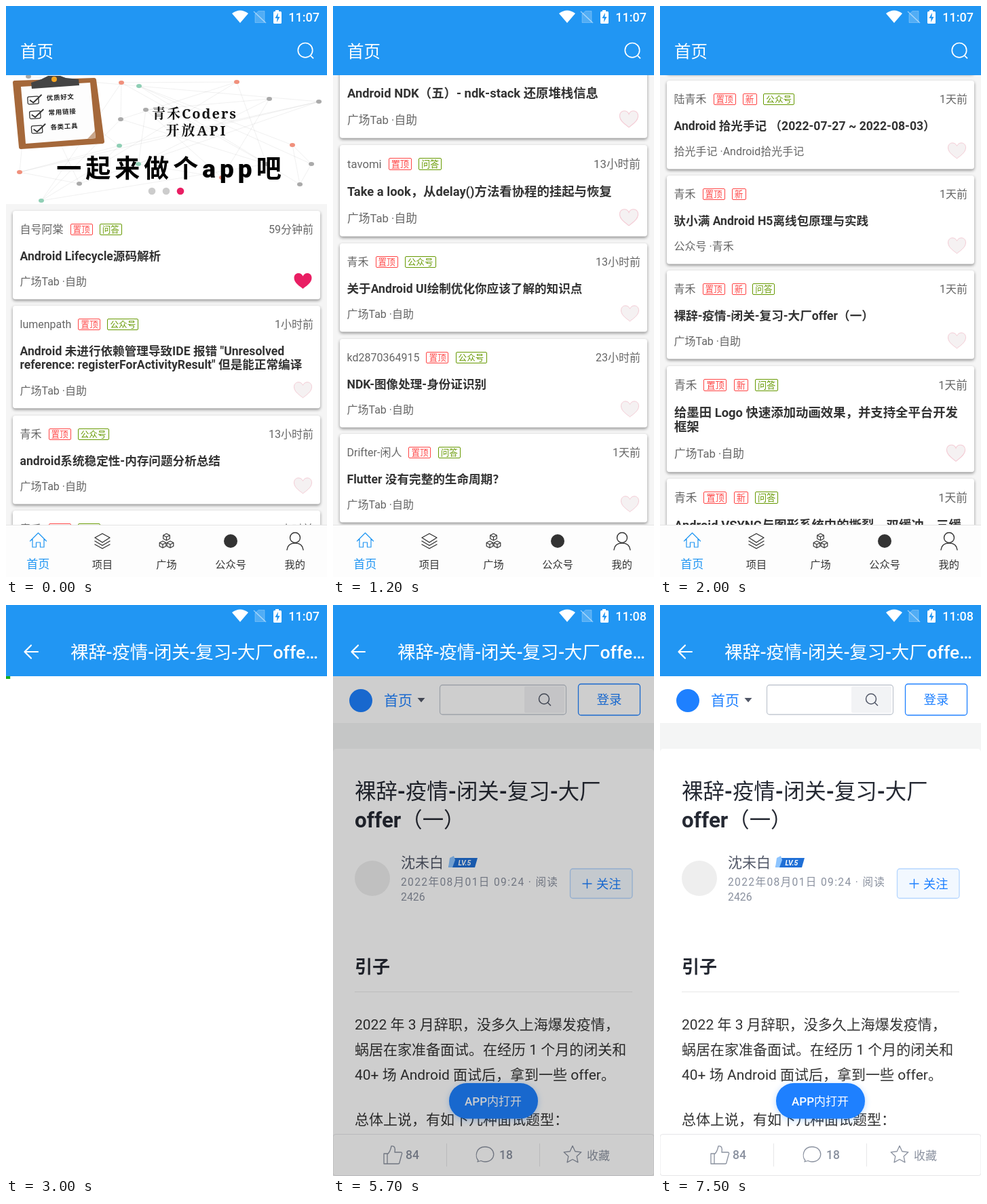
These frames come from a looping animation (473 by 842 pixels, 8000 ms). An HTML page with a canvas:

```html
<!DOCTYPE html>
<html lang="zh-CN">
<head>
<meta charset="utf-8">
<title>文章阅读</title>
<style>
html, body { margin: 0; width: 100%; height: 100%; overflow: hidden; background: #fff; }
canvas { display: block; width: 473px; height: 842px; }
</style>
</head>
<body>
<canvas id="stage"></canvas>
<script>
const W = 473, H = 842, LOOP = 8000;
const BLUE = '#2196f3', LINK = '#1e80ff', PINK = '#e91e63', RED = '#ff4444', GREEN = '#669900';
const FONT = 'Roboto, "Noto Sans CJK SC", "Noto Sans CJK", sans-serif';
const SERIF = '"Noto Serif", "Noto Serif CJK SC", "Noto Sans CJK SC", serif';
const HEART = new Path2D('M0 11.5C-4 8-13 3-13-4.5C-13-9-10-11.5-6.5-11.5C-3.5-11.5-1-9.5 0-7C1-9.5 3.5-11.5 6.5-11.5C10-11.5 13-9 13-4.5C13 3 4 8 0 11.5Z');

const canvas = document.getElementById('stage');
const ctx = canvas.getContext('2d');
const dpr = window.devicePixelRatio || 1;
canvas.width = W * dpr;
canvas.height = H * dpr;

// name, tags, time, title, category, large layout
const posts = [
  ['自号阿棠', '置顶 问答', '59分钟前', 'Android Lifecycle源码解析'],
  ['lumenpath', '置顶 公众号', '1小时前', 'Android 未进行依赖管理导致IDE 报错 "Unresolved\nreference: registerForActivityResult" 但是能正常编译'],
  ['青禾', '置顶 公众号', '13小时前', 'android系统稳定性-内存问题分析总结'],
  ['青禾', '置顶 问答', '13小时前', 'Android 开发中常用的Hook应用'],
  ['青禾', '置顶 问答', '13小时前', 'Android NDK（五）- ndk-stack 还原堆栈信息', 0, 1],
  ['tavomi', '置顶 问答', '13小时前', 'Take a look，从delay()方法看协程的挂起与恢复', 0, 1],
  ['青禾', '置顶 公众号', '13小时前', '关于Android UI绘制优化你应该了解的知识点'],
  ['kd2870364915', '置顶 公众号', '23小时前', 'NDK-图像处理-身份证识别'],
  ['Drifter-闲人', '置顶 问答', '1天前', 'Flutter 没有完整的生命周期？'],
  ['陆青禾', '置顶 新 公众号', '1天前', 'Android 拾光手记 （2022-07-27 ~ 2022-08-03）', '拾光手记 ·Android拾光手记'],
  ['青禾', '置顶 新', '1天前', '驮小满 Android H5离线包原理与实践', '公众号 ·青禾'],
  ['青禾', '置顶 新 问答', '1天前', '裸辞-疫情-闭关-复习-大厂offer（一）'],
  ['青禾', '置顶 新 问答', '1天前', '给墨田 Logo 快速添加动画效果，并支持全平台开发\n框架', 0, 1],
  ['青禾', '置顶 新 问答', '1天前', 'Android VSYNC与图形系统中的撕裂、双缓冲、三缓\n冲浅析', 0, 1]
].map(([name, tags, time, title, cat, big]) => {
  const lines = title.split('\n'), k = big ? 1.033 : 1;
  return { name, tags: tags.split(' '), time, lines, cat: cat || '广场Tab ·自助', big, k,
    h: (lines.length > 1 ? 151.2 : 130.4) * k };
});

// Draws text centred on y and returns its right end.
function text(s, x, y, size, color, o = {}) {
  ctx.font = `${o.w || 400} ${size}px ${o.font || FONT}`;
  ctx.letterSpacing = (o.ls || 0) + 'px';
  ctx.textAlign = o.align || 'left';
  ctx.fillStyle = color;
  ctx.fillText(s, x, y + size * 0.37);
  return x + ctx.measureText(s).width;
}

// Chinese parts stay regular, the rest takes weight w.
function mixed(s, x, y, size, color, w) {
  for (const part of s.match(/[\u3000-\uffef]+|[^\u3000-\uffef]+/g))
    x = text(part, x, y, size, color, { w: part[0] >= '\u3000' ? 400 : w });
}

function rect(x, y, w, h, color) {
  ctx.fillStyle = color;
  ctx.fillRect(x, y, w, h);
}

function box(x, y, w, h, r, fill, stroke, lw = 1) {
  ctx.beginPath();
  ctx.roundRect(x, y, w, h, r);
  paint(fill, stroke, lw);
}

function disc(x, y, r, fill, stroke, lw) {
  ctx.beginPath();
  ctx.arc(x, y, r, 0, 7);
  paint(fill, stroke, lw);
}

function poly(pts, fill, stroke, lw, open) {
  ctx.beginPath();
  for (let i = 0; i < pts.length; i += 2) ctx.lineTo(pts[i], pts[i + 1]);
  if (!open) ctx.closePath();
  paint(fill, stroke, lw);
}

function paint(fill, stroke, lw = 1) {
  if (fill) { ctx.fillStyle = fill; ctx.fill(); }
  if (stroke) { ctx.strokeStyle = stroke; ctx.lineWidth = lw; ctx.stroke(); }
}

function svg(d, x, y, color, lw) {
  ctx.save();
  ctx.translate(x, y);
  ctx.lineJoin = ctx.lineCap = 'round';
  ctx.strokeStyle = color;
  ctx.lineWidth = lw;
  ctx.stroke(new Path2D(d));
  ctx.restore();
}

function shadow(color, blur, dy) {
  ctx.shadowColor = color;
  ctx.shadowBlur = blur * dpr;
  ctx.shadowOffsetY = dy * dpr;
}
const noShadow = () => shadow('transparent', 0, 0);

function statusBar(clock) {
  ctx.beginPath();
  ctx.moveTo(345, 25);
  ctx.lineTo(333, 11);
  ctx.quadraticCurveTo(345, 2, 357, 11);
  ctx.closePath();
  paint('#fff');
  poly([367, 12, 372, 7.5, 381, 7.5, 381, 24.5, 367, 24.5], 'rgba(255,255,255,.22)', 'rgba(255,255,255,.25)', 1);
  poly([365, 8, 383, 25], null, 'rgba(255,255,255,.5)', 1.4, true);
  rect(397, 6, 5, 3, '#fff');
  box(394, 8, 12, 18, 1.5, '#fff');
  poly([401, 10, 396.5, 18, 399.5, 18, 399, 24, 403.5, 16, 400.5, 16], BLUE);
  text(clock, 462, 16.5, 18, '#fff', { w: 500, align: 'right' });
}

function banner() {
  rect(0, 102, W, 190, '#fff');
  const pts = [33, 104, 170, 113, 196, 118, 388, 137, 461, 141, 169, 167, 422, 205, 195, 233,
    167, 206, 384, 233, 433, 263, 318, 253, 20, 245, 52, 287, 450, 233, 206, 153, 108, 262, 340, 112];
  const hues = ['#aaa', '#aaa', '#8fcfb5', '#f0907c'];
  const n = pts.length / 2;
  for (let i = 0; i < n; i++) for (let j = i + 1; j < n; j++)
    if ((i * 7 + j * 5) % 4 === 0)
      poly([pts[2 * i], pts[2 * i + 1], pts[2 * j], pts[2 * j + 1]], null, 'rgba(120,120,120,.16)', 0.7, true);
  for (let i = 0; i < n; i++) {
    ctx.beginPath();
    ctx.ellipse(pts[2 * i], pts[2 * i + 1], 4, 3, 0, 0, 7);
    paint(hues[(i * 3 + (i >> 2)) % 4]);
  }

  ctx.lineJoin = 'round';
  poly([13, 113, 130, 109, 142, 200, 22, 208], '#a5683a', '#a5683a', 6);
  poly([22, 119, 124, 113, 132, 195, 29, 203], '#fdfdfd');
  poly([132, 195, 131, 184, 120, 196], '#c9a68b');
  poly([37, 113, 52, 108, 62, 103, 80, 103, 88, 106, 107, 108, 108, 117, 38, 122], '#444');
  disc(71, 108, 4, '#f5a623');
  ctx.lineJoin = 'miter';
  ['优质好文', '常用链接', '各类工具'].forEach((s, i) => {
    ctx.save();
    ctx.translate(32 + i * 2.8, 139 + i * 21.5);
    ctx.rotate(-0.06);
    box(0, -5, 16, 11, 2, null, '#333', 1.3);
    poly([3, 0, 8, 4, 21, -7], null, '#333', 1.8, true);
    text(s, 28, -1.5, 9.5, '#222', { w: 900, ls: 0.7 });
    ctx.restore();
  });

  text('青禾Coders', 278, 159, 20, '#111', { w: 700, ls: 2, align: 'center', font: SERIF });
  text('开放API', 281, 184, 20, '#111', { w: 700, ls: 3, align: 'center', font: SERIF });
  text('一起来做个app吧', 243, 239.5, 37, '#000', { w: 900, ls: 6, align: 'center' });
  [215, 236, 257].forEach((x, i) => disc(x, 273, 5.3, i === 2 ? PINK : '#ccc'));
}

function card(p, y, liked) {
  const { k } = p, f = p.big ? 1.045 : 1, x = p.big ? 21 : 20.5;
  shadow('rgba(0,0,0,.42)', 4, 2);
  box(10, y, 453, p.h, 4, '#fff');
  noShadow();
  const top = y + 27 * k;
  let tx = text(p.name, x, top, 16 * f, '#666') + 10;
  for (const tag of p.tags) {
    const color = tag === '置顶' || tag === '新' ? RED : GREEN;
    const w = tag.length * 12.6 * f + 8, h = 17 * f;
    box(Math.round(tx) + 0.5, Math.round(top - h / 2) + 0.5, Math.round(w) - 1, Math.round(h) - 1, 1.5, null, color);
    text(tag, tx + 4, top, 12.6 * f, color);
    tx += w + 10;
  }
  text(p.time, 453, top, 16 * f, '#666', { align: 'right' });
  p.lines.forEach((s, i) => text(s, x, y + (66 + i * 20.6) * k, 17.6 * f, '#333', { w: 700 }));
  const base = y + p.h - 26.5 * k;
  text(p.cat, x, base, 16 * f, '#666');
  ctx.save();
  ctx.translate(p.big ? 436 : 437.5, base - 0.5);
  ctx.scale(f, f);
  ctx.fillStyle = liked ? PINK : '#f5f1f2';
  ctx.fill(HEART);
  if (!liked) {
    ctx.strokeStyle = '#f4ccd5';
    ctx.lineWidth = 1;
    ctx.stroke(HEART);
  }
  ctx.restore();
}

function navBar() {
  rect(0, 766, W, 76, '#fdfdfd');
  rect(0, 765, W, 1, '#e4e4e4');
  const dark = '#333';
  svg('M-12 1L0-11L12 1M-8.5-2V10H-3V3H3V10H8.5V-2', 47.5, 788, BLUE, 1.2);
  svg('M0-11L11-5L0 2L-11-5ZM-11 0L0 6.5L11 0M-11 5L0 11L11 5', 142, 789, dark, 1.4);
  for (const [x, y] of [[236.5, 783], [231, 794], [242, 794]])
    svg('M0-5L4.8-2.5V2.5L0 5L-4.8 2.5V-2.5ZM-4.8-2.5L0 0L4.8-2.5M0 0V5', x, y, dark, 1.2);
  disc(331, 789, 10, dark);
  disc(426, 784, 7.5, null, dark, 1.4);
  svg('M-12 13C-11 5-6 3 0 3S11 5 12 13', 426, 789, dark, 1.4);
  ['首页', '项目', '广场', '公众号', '我的'].forEach((s, i) =>
    text(s, 47.3 + i * 94.6, 823, i ? 15.2 : 17, i ? dark : BLUE, { align: 'center' }));
}

// A drag, then a fling that loses a fifth of its speed per step.
function scrollAt(t) {
  if (t < 800) return 0;
  if (t < 1200) return [33, 167, 320, 627][(t - 800) / 100];
  const n = Math.min(10, (t - 1200) / 100);
  return 824.4 + Math.min(706, 795 * (1 - 0.8 ** n));
}

function homeScreen(t) {
  rect(0, 0, W, H, '#f5f5f5');
  const dy = Math.round(scrollAt(t));
  ctx.save();
  ctx.translate(0, -dy);
  if (dy < 200) banner();
  let y = 302;
  posts.forEach((p, i) => {
    if (y - dy < 780 && y + p.h - dy > 95) card(p, Math.round(y), i === 0);
    y += p.h + 10 * p.k;
  });
  ctx.restore();
  navBar();
  rect(0, 0, W, 102, BLUE);
  text('首页', 21, 67, 24.5, '#fff');
  disc(441, 65.2, 10.7, null, '#fff', 1.7);
  poly([448.5, 72.8, 453, 77.3], null, '#fff', 1.8, true);
  statusBar('11:07');
}

function siteHeader() {
  rect(0, 105, W, 69, '#fff');
  disc(41, 141, 17, LINK);
  text('首页', 75, 140.5, 21, LINK);
  poly([124.5, 137, 135.5, 137, 130, 143.5], '#515767');
  box(157.5, 118, 186, 43.5, 4, '#fff', '#c2c8d1', 1.3);
  box(282, 120, 59, 39, 2, '#f2f3f5');
  disc(311, 138.5, 7.5, null, '#515767', 1.5);
  poly([316.5, 144, 321, 148.5], null, '#515767', 1.5, true);
  box(361.5, 116.5, 91, 46, 4, '#fff', LINK, 1.3);
  text('登录', 407, 139, 18.5, LINK, { align: 'center' });
  rect(0, 174, W, H - 174, '#f4f5f5');
}

function skeleton() {
  box(0, 212, W, H, 5, '#fafafb');
  const gray = '#eee';
  disc(43, 265, 11, gray);
  for (const [x, y, w, h] of [[61, 258, 41, 6], [61, 268, 17, 5], [32, 290, 388, 205], [32, 520, 182, 18], [32, 552, 317, 12]])
    rect(x, y, w, h, gray);
}

function article() {
  const ink = '#252933', gray = '#8a919f';
  box(0, 212, W, H, 5, '#fff');
  mixed('裸辞-疫情-闭关-复习-大厂', 32, 274.5, 31.4, ink, 700);
  mixed('offer（一）', 32, 316, 31.4, ink, 700);
  disc(58, 403, 26, '#eee');
  text('沈未白', 100, 379, 21, '#515767');
  poly([174, 373, 213, 373, 209, 387, 170, 387], '#1f6fd6');
  poly([170, 387, 172, 373, 178, 370, 180, 376, 176, 387], '#8ec5ff');
  text('LV.5', 194, 380, 10.5, '#fff', { w: 'italic 700', align: 'center' });
  text('2022年08月01日 09:24 · 阅读', 100, 408, 15.6, gray, { ls: 1.35 });
  text('2426', 100, 430.5, 15.8, gray);
  box(349.5, 389, 91.5, 43.5, 4, '#f2f8ff', '#b5d6ff', 1.3);
  svg('M-6.5 0H6.5M0-6.5V6.5', 374.5, 411, LINK, 1.4);
  text('关注', 388, 411.5, 18.3, LINK);
  text('引子', 32, 533, 26, ink, { w: 700 });
  rect(32, 570, 409, 1, '#e8e8e8');
  ['2022 年 3 月辞职，没多久上海爆发疫情，', '蜗居在家准备面试。在经历 1 个月的闭关和', '40+ 场 Android 面试后，拿到一些 offer。']
    .forEach((s, i) => text(s, 32, 618 + i * 37, 21, '#333'));
  text('总体上说，有如下几种面试题型：', 32, 758, 21, '#333');

  box(0, 780.5, W, 61, 4, '#fff', '#e6e6e8');
  rect(167, 794, 1, 34, '#e6e6e8');
  rect(304, 794, 1, 34, '#e6e6e8');
  svg('M-13-2H-8V13H-13ZM-8-1C-4-4-3-8-2-13C3-14 4-10 3-4H12C14-4 14-2 13 0L10 11C10 12 9 13 8 13H-8', 88, 811, gray, 1.3);
  text('84', 107, 811, 17.5, gray, { w: 500 });
  svg('M-10 9C-15 4-14-11 0-11C17-11 17 11 0 11C-2 11-5 10-6 9.5L-11 11Z', 224, 810, gray, 1.3);
  text('18', 245, 811, 17.5, gray, { w: 500 });
  let star = 'M';
  for (let i = 0; i < 10; i++) {
    const a = i * Math.PI / 5, r = i % 2 ? 6.5 : 13.5;
    star += `${(r * Math.sin(a)).toFixed(2)} ${(-r * Math.cos(a)).toFixed(2)}${i < 9 ? 'L' : 'Z'}`;
  }
  svg(star, 353, 811, gray, 1.3);
  text('收藏', 374, 811.5, 17, gray);

  shadow('rgba(30,128,255,.3)', 10, 2);
  box(171, 705, 131, 52.5, 26, LINK);
  noShadow();
  mixed('APP内打开', 194, 731.5, 17, '#fff', 500);
}

function sheet(dy) {
  ctx.save();
  ctx.translate(0, dy);
  box(0, 572, W, 280, 5, '#fafafa');
  text('继续浏览内容', 27, 603, 18.3, '#252933');
  rect(21, 634, 430, 1, '#e8e8e8');
  box(29, 664.5, 55, 55, 6, LINK);
  text('墨田码集', 100, 680, 21, '#252933');
  text('一个帮助开发者成长的社区', 100, 709, 15.7, '#9aa0ab');
  box(323, 670, 121, 47, 2, LINK);
  text('确定', 383.5, 693, 18.5, '#fff', { align: 'center' });
  box(29, 758, 55, 55, 6, '#ff8f1f');
  mixed('ZL浏览器', 100, 785.5, 21, '#252933', 500);
  box(323.5, 762.5, 120, 46, 2, null, LINK, 1.2);
  text('继续', 383.5, 785, 18.5, LINK, { align: 'center' });
  ctx.restore();
}

const clamp = v => Math.max(0, Math.min(1, v));
const ramp = (t, t0, t1, a, b) => a + (b - a) * clamp((t - t0) / (t1 - t0));

function progressAt(t) {
  if (t < 3900) return t < 3000 ? 0 : ramp(t, 2900, 3800, 0, 56);
  if (t < 4400) return ramp(t, 3800, 4400, 56, 418);
  if (t < 5000) return ramp(t, 4400, 4900, 418, 468);
  return t >= 6700 && t < 7500 ? ramp(t, 6700, 7400, 186, 468) : 0;
}

function readerScreen(t) {
  rect(0, 0, W, H, '#fff');
  if (t >= 4200) {
    siteHeader();
    if (t < 5500) skeleton(); else article();
  }
  const leave = clamp((t - 6700) / 300);
  const dim = 0.6 * clamp((t - 5570) / 230) ** 2 * (1 - leave);
  if (dim > 0) rect(0, 105, W, H - 105, `rgba(0,0,0,${dim})`);
  if (t >= 6000 && leave < 1) sheet(270 * leave * leave);

  rect(0, 0, W, 105, BLUE);
  svg('M10 0H-9M0-9.5L-9.5 0L0 9.5', 37, 69, '#fff', 2.2);
  mixed('裸辞-疫情-闭关-复习-大厂offe…', 95, 69.5, 26.4, '#fff', 500);
  statusBar(t < 4500 ? '11:07' : '11:08');
  rect(0, 105, progressAt(t), 4, '#1aad19');
}

function draw(now) {
  const t = Math.floor((now % LOOP) / 100) * 100;
  ctx.setTransform(dpr, 0, 0, dpr, 0, 0);
  if (t < 2700) homeScreen(t); else readerScreen(t);
}

const start = performance.now();
function tick() {
  draw(performance.now() - start);
  requestAnimationFrame(tick);
}
tick();
</script>
</body>
</html>
```
